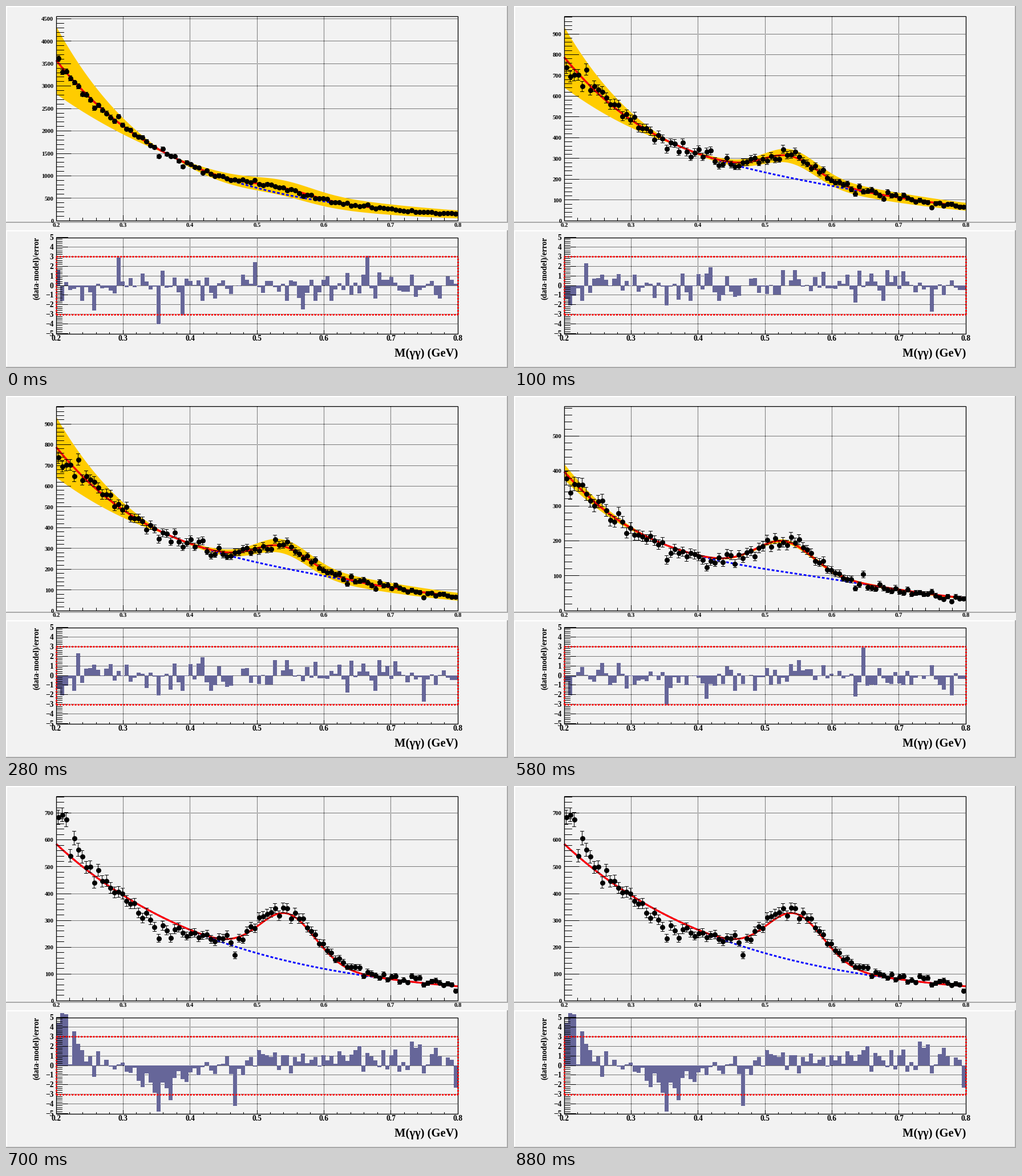
A matplotlib script that plays this animation: 880 by 636 pixels, repeating every 1 s.

```python
import numpy as np
import matplotlib.pyplot as plt
from matplotlib.animation import FuncAnimation
from matplotlib.patches import Rectangle

W, H, DPI = 880, 636, 100
PX = 72 / DPI                       # points per pixel
LEFT, RIGHT = 88, 792
TOP, BASE = 18, 377.4               # fit panel
RTOP, RBASE = 406.5, 575.5          # pull panel
RZERO, RUNIT = 491, 16.9
BINS = 100
BIN_W = (RIGHT - LEFT) / BINS

GOLD, SLATE, PAD, SHADE = "#ffcc00", "#666699", "#f2f2f2", "#a9a9a9"

plt.rcParams["font.family"] = "Liberation Serif"
plt.rcParams["font.weight"] = "bold"

fig = plt.figure(figsize=(W / DPI, H / DPI), dpi=DPI, facecolor=PAD)
ax = fig.add_axes([0, 0, 1, 1])
ax.axis("off")

# yscale: pixels per count; step: counts between labels
# ends, wave: background at both edges and its bend in between
# peak: height, mean, width; band: slope left and right of its waist
# far: strongest pulls by bin; steep: data fall faster than the model
FITS = [
    dict(yscale=0.0789, step=500, ends=(3575, 150), wave=0,
         peak=(140, 0.537, 0.045), band=(0.75, 0.82), seed=3,
         far={9: -2.6, 15: 2.9, 25: -4, 31: -3.1, 49: 2.4, 61: -2.5, 77: 3.1}),
    dict(yscale=0.3648, step=100, ends=(788, 69), wave=0.09,
         peak=(105, 0.537, 0.040), band=(0.66, 0.38), seed=8,
         far={1: -2.1, 5: 2.3, 25: -2.1, 36: 1.9, 72: -1.8, 91: -2.7}),
    dict(yscale=0.6142, step=100, ends=(398, 36), wave=0.14,
         peak=(88, 0.529, 0.043), band=(0.2, 0.1), seed=5,
         far={1: -2.1, 25: -3.1, 35: -2.4, 72: -2.2, 74: 2.9, 96: -2.1}),
    dict(yscale=0.471, step=100, ends=(585, 54), wave=0,
         peak=(177, 0.545, 0.042), band=None, seed=11, steep=True,
         far={3: 0.1, 25: -4.8, 28: -3.6, 44: -4.2, 88: 2.5, 99: -2.3}),
]


def to_x(mass):
    return LEFT + (mass - 0.2) / 0.6 * (RIGHT - LEFT)


def centre(v):
    """Centre of the pixel that holds v."""
    return np.floor(v) + 0.5


def line(x, y, color="black", width=1.0, z=6, **kw):
    return ax.plot(x, y, color=color, lw=width * PX, zorder=z,
                   solid_capstyle="butt", dash_capstyle="butt", **kw)[0]


def grid_line(x, y):
    return line(centre(x), centre(y), z=1, ls=(0, (1, 2)),
                antialiased=False, snap=False)


def segments(x0, x1, y0, y1, z=6):
    """Many short strokes as one line with gaps."""
    x0, x1, y0, y1 = np.broadcast_arrays(x0, x1, y0, y1)
    gap = np.full(len(x0), np.nan)
    return line(centre(np.c_[x0, x1, gap].ravel()),
                centre(np.c_[y0, y1, gap].ravel()),
                z=z, antialiased=False, snap=False)


def label(x, y, s, size, ha="center", va="baseline", **kw):
    return ax.text(x, y, s, fontsize=size * PX, ha=ha, va=va, zorder=8, **kw)


def draw_pad(y0, y1):
    for x, y, w, h, color in [(0, y0, W, 2, "white"),
                              (0, y0, 2, y1 - y0, "white"),
                              (0, y1 - 2, W, 2, SHADE),
                              (W - 2, y0, 2, y1 - y0, SHADE)]:
        ax.add_patch(Rectangle((x, y), w, h, fc=color, lw=0, zorder=0))


def draw_panel(top, base, size, label_y, tick):
    ax.add_patch(Rectangle((LEFT, top), RIGHT - LEFT, base - top, fill=False,
                           ec="black", lw=1.3 * PX, zorder=6))
    for k in range(31):
        mass = 0.2 + 0.02 * k
        x = to_x(mass)
        major = k % 5 == 0
        segments([x], [x], [base], [base - (tick if major else tick / 2)])
        if major:
            label(x, label_y, f"{mass:.1f}", size)
            if 0 < k < 30:
                grid_line([x, x], [base, top])


def draw_static():
    draw_pad(0, 381)
    draw_pad(394, H)
    draw_panel(TOP, BASE, 10.6, 388, 10)
    draw_panel(RTOP, RBASE, 13.5, 588, 5)
    for v in range(-5, 6):
        y = RZERO - v * RUNIT
        label(83.5, y + 4.5, str(v).replace("-", "\u2212"), 13.5, "right")
        if abs(v) < 5:
            grid_line([LEFT, RIGHT], [y, y])
    ticks = np.arange(-25, 26)
    rows = RZERO - ticks / 5 * RUNIT
    segments(LEFT, np.where(ticks % 5, 98, 108), rows, rows)
    hi, lo = RZERO - 3 * RUNIT, RZERO + 3 * RUNIT
    for xs, ys in [((LEFT, RIGHT), (hi, hi)), ((LEFT, RIGHT), (lo, lo)),
                   ((LEFT, LEFT), (lo, hi)), ((RIGHT, RIGHT), (lo, hi))]:
        line(xs, ys, "red", 2.8, 7, ls=(0, (1.1, 0.8)))
    label(RIGHT, 616, "M(γγ) (GeV)", 20.6, "right")
    label(54, 406, "(data-model)/error", 13.7, va="top", rotation=90)


def make_pulls(fit):
    rng = np.random.default_rng(fit["seed"])
    pulls = np.clip(rng.normal(0, 0.8, BINS), -1.6, 1.6)
    if fit.get("steep"):
        b = np.arange(BINS)
        pulls += (3.8 * np.exp(-(b / 5.5) ** 6) + 0.6
                  - 2 * np.exp(-((b - 27) / 13) ** 2))
    for k, v in fit["far"].items():
        pulls[k] = v
    return pulls


def draw_fit(fit):
    """Draw one fit with its pulls and return the artists."""
    art = []
    scale, step = fit["yscale"], fit["step"]
    first, last = fit["ends"]
    height, mean, width = fit["peak"]

    def background(m):
        t = (m - 0.2) / 0.6
        bend = fit["wave"] * np.sin(2 * np.pi * t)
        return first * (last / first) ** t * np.exp(-bend)

    def model(m):
        return background(m) + height * np.exp(-0.5 * ((m - mean) / width) ** 2)

    def to_y(v):
        return BASE - v * scale

    # axis
    ticks = np.arange(0, (BASE - TOP) / scale, step / 5)
    major = np.arange(len(ticks)) % 5 == 0
    art.append(segments(LEFT, np.where(major, 113, 101),
                        to_y(ticks), to_y(ticks)))
    for v in ticks[major]:
        art.append(label(83.5, to_y(v) + 3.7, f"{v:.0f}", 10.6, "right"))
        if v:
            art.append(grid_line([LEFT, RIGHT], [to_y(v)] * 2))

    # curves
    m = np.linspace(0.2, 0.8, 300)
    x, y = to_x(m), to_y(model(m))
    if fit["band"]:
        off = (m - 0.2) / 0.6 - 0.28
        slope = np.where(off < 0, *fit["band"])
        half = np.maximum(slope * np.abs(off) * model(m) * scale, 1.5)
        art.append(ax.fill_between(x, y - half, y + half, color=GOLD, lw=0,
                                   zorder=2))
    art.append(line(x, to_y(background(m)), "blue", 3, 3, ls=(0, (1.6, 1.1))))
    art.append(line(x, y, "red", 3.2, 4))

    # pulls
    bins = np.arange(BINS)
    pulls = make_pulls(fit)
    art += ax.bar(LEFT + BIN_W * bins, -pulls * RUNIT, BIN_W, RZERO,
                  align="edge", color=SLATE, lw=0, zorder=2,
                  antialiased=False)

    # data points follow from the pulls
    mid = 0.2 + 0.6 * (bins + 0.5) / BINS
    data = model(mid) + pulls * np.sqrt(model(mid))
    err = np.sqrt(data) * scale
    px, py = to_x(mid), to_y(data)
    art.append(segments(px, px, py - err, py + err, 5))
    for end in (py - err, py + err):
        art.append(segments(px - 3, px + 3, end, end, 5))
    art += ax.plot(px, py, "o", color="black", ms=9 * PX, mew=0, zorder=5)
    return art


draw_static()
groups = [draw_fit(fit) for fit in FITS]
ax.set(xlim=(0, W), ylim=(H, 0))


def update(i):
    current = (i + 2) // 3          # first fit lasts 100 ms, the others 300 ms
    for k, group in enumerate(groups):
        for artist in group:
            artist.set_visible(k == current)
    return []


anim = FuncAnimation(fig, update, frames=10, interval=100, repeat=True,
                     repeat_delay=0, blit=False)
plt.show()
```
